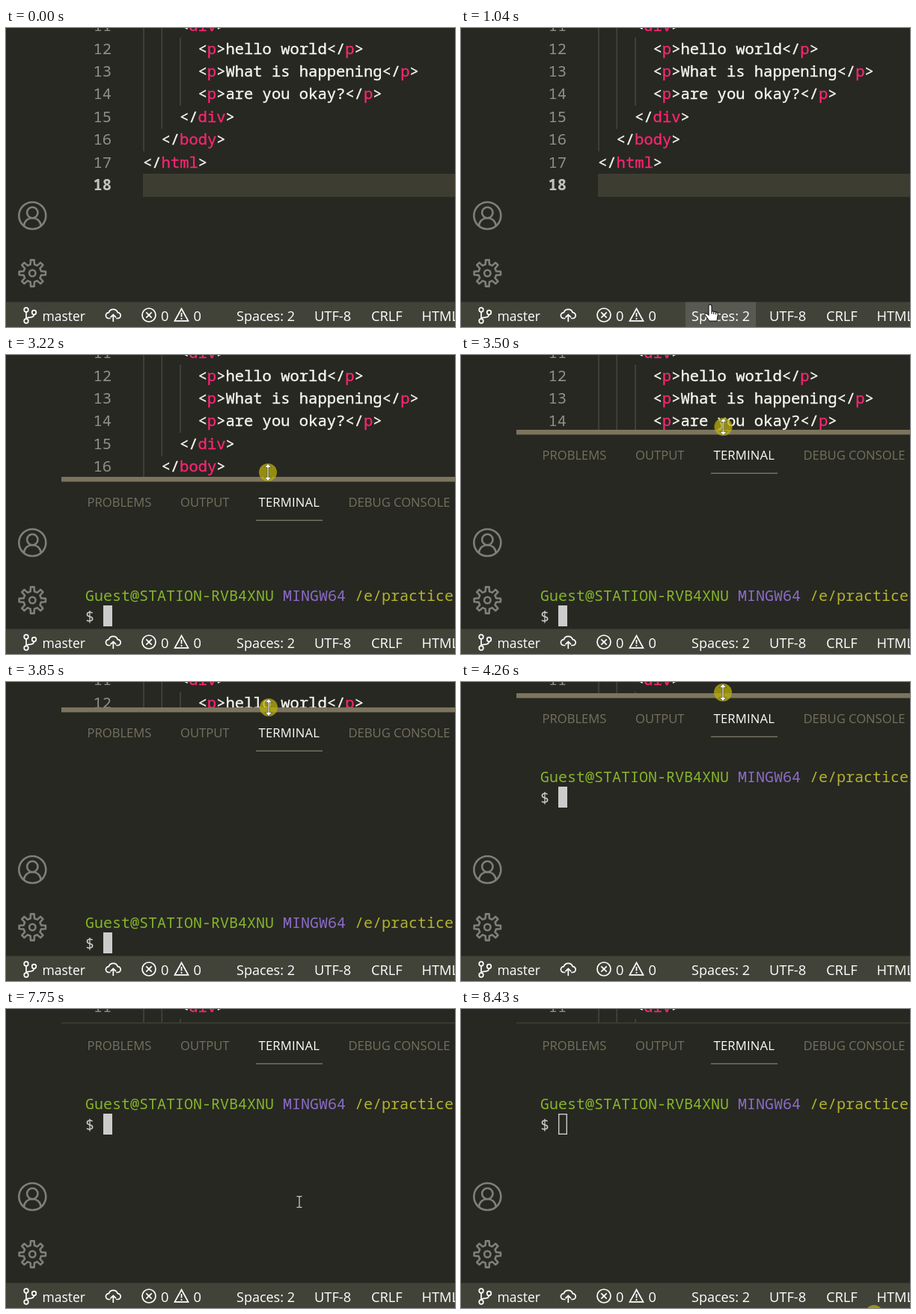
These frames come from a looping animation (600 by 400 pixels, 8.49 s). An HTML page:

```html
<!DOCTYPE html>
<html lang="en">
<head>
<meta charset="utf-8">
<title>Opening a terminal panel</title>
<style>
html, body { margin: 0; width: 100%; height: 100%; overflow: hidden; background: #272822; }
svg { display: block; width: 100vw; height: 100vh; }
text { white-space: pre; }

.code { font: 20.5px "Noto Sans Mono", monospace; fill: #f8f8f2; stroke: #f8f8f2; stroke-width: .35; }
.code tspan { fill: #f92672; stroke: #f92672; }
.numbers { fill: #90908a; stroke: none; }
.numbers .active { fill: #c2c2bf; font-weight: 600; }
.guides { stroke: #464741; stroke-width: 1.5; }
.shell { font: 20px "Noto Sans Mono", monospace; fill: #ccc; }
.tabs { font: 16.6px "Open Sans", sans-serif; fill: #75715e; }
.status { font: 18.3px "Open Sans", sans-serif; fill: #fff; }
.status .branch { font-size: 17.5px; }
.status .indent { font-size: 18px; }
.icons { fill: none; stroke: #fff; stroke-width: 1.7; }
.activity { fill: none; stroke: #7f7f7a; stroke-width: 2.6; }

/* One loop is 8490 ms; 1% is 84.9 ms. */
.anim { animation: 8490ms step-end infinite; }
#pointer { animation-name: travel; }
#hand { animation-name: hand; }
#beam { animation-name: beam; }
#resize { animation-name: resize; }
#press { animation-name: press; }
#hover { animation-name: hover; }
#panel, #sash { animation-name: drag; }
#glow { animation-name: glow; }
#shell { animation-name: shell; }
#block { animation-name: block; }

@keyframes travel {
  0% { transform: translate(515px, 420px); }
  2.35% { transform: translate(515px, 394px); animation-timing-function: steps(3, end); }
  4.82% { transform: translate(430px, 348px); animation-timing-function: steps(3, end); }
  7.3% { transform: translate(257px, 324px); animation-timing-function: steps(2, end); }
  8.95% { transform: translate(331px, 361px); }
  10.6% { transform: translate(331px, 361px); animation-timing-function: steps(3, start); }
  12.2% { transform: translate(333px, 370px); }
  15.31% { transform: translate(331px, 364px); }
  24.02% { transform: translate(331px, 363px); animation-timing-function: steps(9, end); }
  31.44% { transform: translate(330px, 270px); animation-timing-function: steps(3, end); }
  33.92% { transform: translate(338px, 248px); animation-timing-function: steps(5, end); }
  37.92% { transform: translate(350px, 157px); animation-timing-function: steps(8, end); }
  44.52% { transform: translate(351px, 35px); }
  45.34% { transform: translate(351px, 34px); animation-timing-function: steps(4, end); }
  48.52% { transform: translate(350px, 14px); }
  54.06% { transform: translate(350px, 14px); animation-timing-function: steps(10, end); }
  62.42% { transform: translate(392px, 258px); }
  91.28% { transform: translate(392px, 258px); animation-timing-function: steps(6, end); }
  96.11%, 100% { transform: translate(552px, 408px); }
}
@keyframes hand {
  0%, 3.18%, 15.31% { opacity: 0; }
  2.35%, 10.6%, 94.5%, 100% { opacity: 1; }
}
@keyframes beam {
  0%, 10.6%, 94.5%, 100% { opacity: 0; }
  3.18%, 54.88% { opacity: 1; }
}
@keyframes resize {
  0%, 54.88%, 100% { opacity: 0; }
  15.31% { opacity: 1; }
}
@keyframes press {
  0%, 54.06% { opacity: 0; }
  24.02%, 98.46%, 100% { opacity: 1; }
}
@keyframes hover {
  0%, 15.31%, 100% { opacity: 0; }
  11.42% { opacity: 1; }
}
@keyframes drag {
  0% { transform: translateY(367px); }
  28.97% { transform: translateY(243px); }
  34.62% { transform: translateY(243px); animation-timing-function: steps(4, end); }
  37.92% { transform: translateY(166px); animation-timing-function: steps(8, end); }
  44.52% { transform: translateY(40px); }
  45.34% { transform: translateY(37px); animation-timing-function: steps(4, end); }
  48.52%, 100% { transform: translateY(18px); }
}
@keyframes glow {
  0% { opacity: 0; }
  20.02% { opacity: 0; animation-timing-function: steps(3, start); }
  21.67% { opacity: 1; }
  54.06% { opacity: 1; animation-timing-function: steps(2, start); }
  55.7%, 100% { opacity: 0; }
}
@keyframes shell {
  0% { opacity: 0; transform: none; }
  28.97% { opacity: 1; transform: none; }
  49.82%, 100% { opacity: 1; transform: translateY(-195px); }
}
@keyframes block {
  0% { fill: #ccc; }
  99.29%, 100% { fill: #272822; }
}
</style>
</head>
<body>
<svg viewBox="0 0 600 400" preserveAspectRatio="none">
  <rect width="600" height="400" fill="#272822"/>

  <!-- editor -->
  <rect x="183" y="195" width="417" height="31" fill="#3e3d32"/>
  <path class="guides" d="M184 0V165M208.3 0V135M233 13V104"/>
  <g class="code numbers" id="numbers"></g>
  <g class="code">
    <text x="232" y="4.2">&lt;<tspan>div</tspan>&gt;</text>
    <text x="256.5" y="34.6">&lt;<tspan>p</tspan>&gt;hello world&lt;/<tspan>p</tspan>&gt;</text>
    <text x="256.5" y="65">&lt;<tspan>p</tspan>&gt;What is happening&lt;/<tspan>p</tspan>&gt;</text>
    <text x="256.5" y="95.4">&lt;<tspan>p</tspan>&gt;are you okay?&lt;/<tspan>p</tspan>&gt;</text>
    <text x="232" y="125.8">&lt;/<tspan>div</tspan>&gt;</text>
    <text x="207.5" y="156.2">&lt;/<tspan>body</tspan>&gt;</text>
    <text x="183" y="186.6">&lt;/<tspan>html</tspan>&gt;</text>
  </g>

  <!-- panel -->
  <g id="panel" class="anim">
    <rect x="74" width="526" height="400" fill="#272822"/>
    <rect x="74" width="526" height="1.3" fill="#414339"/>
    <g class="tabs">
      <text x="108.5" y="36.5">PROBLEMS</text>
      <text x="233" y="36.5">OUTPUT</text>
      <text x="337.5" y="36.5" fill="#fff" style="letter-spacing:.2px">TERMINAL</text>
      <text x="457.5" y="36.5">DEBUG CONSOLE</text>
    </g>
    <rect x="334" y="54.5" width="89" height="1.5" fill="#75715e"/>
  </g>
  <g id="shell" class="shell anim">
    <text x="106" y="329" fill="#86b42b">Guest@STATION-RVB4XNU</text>
    <text x="370" y="329" fill="#8c6bc8">MINGW64</text>
    <text x="466" y="329" fill="#b3b42b">/e/practice/</text>
    <text x="106" y="357">$</text>
    <rect id="block" class="anim" x="130.7" y="335.7" width="10.6" height="26.6" fill="#ccc" stroke="#ccc" stroke-width="1.4"/>
  </g>

  <!-- activity bar -->
  <g class="activity">
    <circle cx="35.3" cy="251" r="18"/>
    <circle cx="35.3" cy="247" r="7.2"/>
    <path d="M23.8 265c1-7.500 6-10.800 11.500-10.800s10.500 3.300 11.500 10.800"/>
    <path id="gear" stroke-linejoin="round"/>
    <circle cx="35.3" cy="328" r="4.2"/>
  </g>

  <!-- status bar -->
  <rect y="366.5" width="600" height="34" fill="#414339"/>
  <rect id="hover" class="anim" x="300" y="366.5" width="94" height="34" fill="#fff" fill-opacity=".12"/>
  <g class="icons">
    <circle cx="27" cy="377" r="2.8"/>
    <circle cx="37.5" cy="380.5" r="2.8"/>
    <circle cx="27" cy="392" r="2.8"/>
    <path d="M27 380v9M37.5 383.3c0 4-4 4-7 4q-3 0-3.5 2"/>
    <path d="M139.5 388.5h-2.2a3.9 3.9 0 0 1 0-7.8a6.3 6.3 0 0 1 12 0a3.9 3.9 0 0 1 0 7.8h-2.2M143.3 393v-9.5m-3.7 3.7l3.7-3.7l3.7 3.7"/>
    <circle cx="191" cy="384" r="9"/>
    <path d="M187.3 380.3l7.4 7.4m0-7.4l-7.4 7.4"/>
    <path d="M234.5 375.5l9 16.3h-18zM234.5 381v5.5m0 1.5v2"/>
  </g>
  <g class="status">
    <text class="branch" x="48.5" y="391.5">master</text>
    <text x="207" y="391.5">0</text>
    <text x="250.5" y="391.5">0</text>
    <text class="indent" x="308" y="391.5">Spaces: 2</text>
    <text x="412" y="391.5">UTF-8</text>
    <text x="488" y="391.5">CRLF</text>
    <text x="555.5" y="391.5">HTML</text>
  </g>

  <g id="sash" class="anim">
    <rect id="glow" class="anim" x="74" y="-3" width="526" height="6.5" fill="#7c745d"/>
  </g>

  <g id="pointer" class="anim">
    <circle id="press" class="anim" r="12" fill="#b9af0a" fill-opacity=".75"/>
    <path id="hand" class="anim" fill="#fff" stroke="#111" stroke-width="1.1"
      d="M0 0c1.5 0 2 1 2 2.5v6l6 1.5c2 .5 2.5 2 2.2 4l-1.2 8h-10l-6-8c-1-1.8 1-3.2 2.6-1.8l2.4 2v-12c0-1.4.6-2.2 2-2.2zM2 8.500v4M4.800 9.500v3.500M7.500 10.300v3"/>
    <path id="beam" class="anim" fill="none" stroke="#c8c8c4" stroke-width="1.3"
      d="M-3.5-7.3h2.5l1 1l1-1h2.5M0-6.3V6.3M-3.5 7.3h2.5l1-1l1 1h2.5"/>
    <path id="resize" class="anim" fill="#fff" stroke="#333" stroke-width=".6"
      d="M0-11.5l4.5 5h-3.6v13h3.6l-4.5 5l-4.5-5h3.6v-13h-3.6z"/>
  </g>
</svg>
<script>
const numbers = document.getElementById("numbers");
for (let line = 11; line <= 18; line++) {
  const label = document.createElementNS(numbers.namespaceURI, "text");
  label.setAttribute("x", 116.5);
  label.setAttribute("y", 217 + (line - 18) * 30.4);
  if (line === 18) label.setAttribute("class", "active");
  label.textContent = line;
  numbers.append(label);
}

// Eight teeth, each a pair of outer corners between two inner ones.
const corners = [];
for (let tooth = 0; tooth < 8; tooth++) {
  for (const [radius, offset] of [[12, -0.22], [17.8, -0.13], [17.8, 0.13], [12, 0.22]]) {
    const angle = tooth * Math.PI / 4 + offset;
    corners.push(`${35.3 + radius * Math.cos(angle)} ${328 + radius * Math.sin(angle)}`);
  }
}
document.getElementById("gear").setAttribute("d", `M${corners.join("L")}Z`);
</script>
</body>
</html>
```
